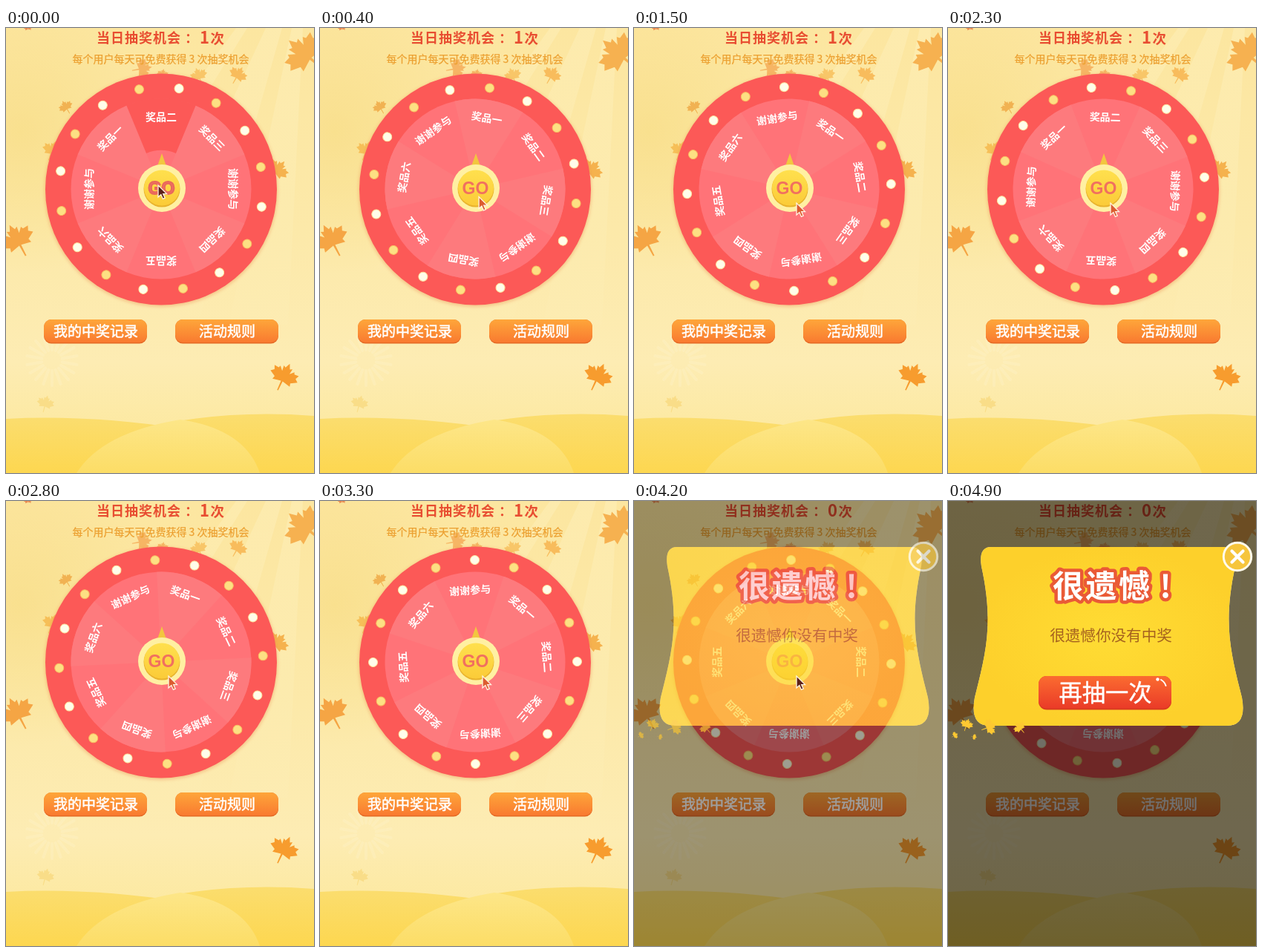
Write an HTML page that moves like this. It is 415 by 600 pixels and loops after 5000 ms.

```html
<!DOCTYPE html>
<html lang="zh-CN">
<head>
<meta charset="utf-8">
<title>幸运转盘</title>
<style>
  html, body { margin: 0; width: 100%; height: 100%; overflow: hidden; background: #fcebb0; }
  svg { display: block; width: 415px; height: 600px; }
  text { font-family: "Noto Sans CJK SC", "Noto Sans CJK", "Noto Sans", sans-serif; }
</style>
</head>
<body>
<svg viewBox="0 0 415 600">
  <defs>
    <linearGradient id="sky" x1="0" y1="0" x2="0" y2="1">
      <stop offset="0" stop-color="#fce6a0"/>
      <stop offset=".45" stop-color="#fce9a9"/>
      <stop offset=".75" stop-color="#fdecb3"/>
      <stop offset="1" stop-color="#fce796"/>
    </linearGradient>
    <radialGradient id="glow" gradientUnits="userSpaceOnUse" cx="20" cy="140" r="190">
      <stop offset="0" stop-color="#f7db80" stop-opacity=".6"/>
      <stop offset="1" stop-color="#f7db80" stop-opacity="0"/>
    </radialGradient>
    <linearGradient id="ray" gradientUnits="userSpaceOnUse" x1="400" y1="0" x2="230" y2="420">
      <stop offset="0" stop-color="#fff7cf" stop-opacity=".3"/>
      <stop offset="1" stop-color="#fff7cf" stop-opacity="0"/>
    </linearGradient>
    <linearGradient id="hill" x1="0" y1="0" x2="0" y2="1">
      <stop offset="0" stop-color="#fbdd6e"/>
      <stop offset="1" stop-color="#fdd750"/>
    </linearGradient>
    <linearGradient id="path" x1="0" y1="0" x2="0" y2="1">
      <stop offset="0" stop-color="#fde688"/>
      <stop offset="1" stop-color="#fcdd66"/>
    </linearGradient>
    <linearGradient id="orange" x1="0" y1="0" x2="0" y2="1">
      <stop offset="0" stop-color="#fea63a"/>
      <stop offset="1" stop-color="#f97a30"/>
    </linearGradient>
    <linearGradient id="red" x1="0" y1="0" x2="0" y2="1">
      <stop offset="0" stop-color="#fb6c30"/>
      <stop offset="1" stop-color="#ea3b28"/>
    </linearGradient>
    <linearGradient id="gold" x1="0" y1="0" x2="0" y2="1">
      <stop offset="0" stop-color="#ffe04e"/>
      <stop offset="1" stop-color="#fbcb38"/>
    </linearGradient>
    <radialGradient id="panelFill">
      <stop offset="0" stop-color="#ffdc34"/>
      <stop offset="1" stop-color="#fdd02b"/>
    </radialGradient>
    <filter id="soft" x="-10%" y="-10%" width="120%" height="120%"><feGaussianBlur stdDeviation="2"/></filter>
  </defs>

  <rect width="415" height="600" fill="url(#sky)"/>
  <rect width="415" height="400" fill="url(#glow)"/>
  <path d="M350 0H372L250 430H150ZM385 0H400L380 400H300ZM310 0H325L120 330H70Z" fill="url(#ray)"/>
  <g id="flower" stroke="#fff6d2" stroke-width="4" stroke-linecap="round" opacity=".25"/>
  <path d="M0 527Q110 521 235 540V600H0Z" fill="url(#hill)"/>
  <path d="M215 533Q310 515 415 523V600H215Z" fill="url(#hill)"/>
  <path d="M95 600Q130 545 235 528Q322 541 342 600Z" fill="url(#path)"/>
  <g id="leaves"/>
  <g id="header"/>

  <circle cx="209" cy="219" r="157" fill="#e88a50" opacity=".4" filter="url(#soft)"/>
  <circle cx="209" cy="217.5" r="156" fill="#fc5957"/>
  <g id="lamps"/>
  <g id="disc"/>
  <g id="picked"/>
  <path d="M210 169L217 189H203Z" fill="#f2c63f"/>
  <circle cx="210" cy="216" r="32" fill="#fff0a2"/>
  <circle cx="210" cy="217" r="24.5" fill="#e9b32d"/>
  <circle cx="210" cy="215.5" r="24" fill="url(#gold)"/>
  <text id="go" x="209.5" y="224.3" font-size="23" font-weight="700" text-anchor="middle" fill="#f1705f"
    stroke="#e8685c" style="font-family:'Liberation Sans',sans-serif">GO</text>
  <g id="buttons"/>

  <path id="shade" fill-rule="evenodd"/>
  <g id="popup">
    <path id="panel" fill="url(#panelFill)"/>
    <g id="petals"/>
    <g id="popupText"/>
    <circle cx="390" cy="75" r="18.7" fill="#f6c53b" stroke="#fffbea" stroke-width="3"/>
    <path d="M382.5 67.5L397.5 82.5M397.5 67.5L382.5 82.5" stroke="#fff" stroke-width="4.2" stroke-linecap="round"/>
  </g>
  <g id="again">
    <rect x="122" y="236" width="179" height="45.5" rx="11" fill="#d93a20"/>
    <rect x="122" y="236" width="179" height="43.5" rx="11" fill="url(#red)"/>
    <circle cx="282.5" cy="240.5" r="2.2" fill="#fff"/>
    <path d="M287 241Q292 244 293.5 249" fill="none" stroke="#fff" stroke-width="2" stroke-linecap="round"/>
  </g>
  <path id="cursor" d="M0 0V16L3.8 12.6L6.4 18.4L9.2 17.2L6.7 11.6H11.5Z" stroke="#fff3e2" stroke-width="1.3"/>
</svg>
<script>
const LOOP = 5000, STEP = 100;
const CX = 209, CY = 217;
const SPIN = { start: 160, length: 4000, angle: 1890 };
const LAMPS = { from: -12.4, lap: 7000 };
const POPUP_AT = 4200;
const PRIZES = ['奖品二', '奖品三', '谢谢参与', '奖品四', '奖品五', '奖品六', '谢谢参与', '奖品一'];
const PANEL = 'M58 62H374Q391 62 387 88C370 165 381 205 396 265Q403 303 376 303H56Q29 303 36 265C51 205 62 165 45 88Q41 62 58 62Z';

const $ = id => document.getElementById(id);

function add(parent, tag, attrs) {
  const node = document.createElementNS('http://www.w3.org/2000/svg', tag);
  for (const key in attrs) node.setAttribute(key, attrs[key]);
  return parent.appendChild(node);
}

// Places CJK text by its vertical middle.
function label(parent, str, x, midY, size, attrs) {
  const node = add(parent, 'text', { x, y: midY + size * 0.38, 'font-size': size, ...attrs });
  node.textContent = str;
  return node;
}

function polar(r, deg) {
  const a = deg * Math.PI / 180;
  return [CX + r * Math.sin(a), CY - r * Math.cos(a)];
}

function sector(inner, outer, from, to) {
  return `M${polar(inner, from)}L${polar(outer, from)}A${outer} ${outer} 0 0 1 ${polar(outer, to)}` +
    `L${polar(inner, to)}A${inner} ${inner} 0 0 0 ${polar(inner, from)}Z`;
}

function prize(parent, name, at) {
  label(parent, name, CX, CY - 97, 14, { fill: '#fff', 'font-weight': 700, 'text-anchor': 'middle',
    transform: `rotate(${at} ${CX} ${CY})` });
}

const HALF_LEAF = [[0, -1], [.16, -.66], [.32, -.74], [.27, -.36], [.52, -.62], [.58, -.48], [.9, -.5],
  [.78, -.24], [1, -.06], [.58, .18], [.64, .4], [.06, .28], [.04, .95]];
const LEAF = 'M' + [...HALF_LEAF, ...HALF_LEAF.map(([x, y]) => [-x, y]).reverse()].join('L') + 'Z';

function leaf(parent, x, y, size, turn, fill) {
  add(parent, 'path', { d: LEAF, fill, transform: `translate(${x} ${y}) rotate(${turn}) scale(${size})` });
}

function build() {
  for (let i = 0; i < 18; i++)
    add($('flower'), 'path', { d: 'M0 -14V-34', transform: `translate(62 448) rotate(${i * 20})` });

  [[404, 36, 30, -50, '#f6b150'], [312, 64, 13, 30, '#f8bc5c'], [183, 55, 14, 80, '#f6b564'],
   [211, 63, 8, 10, '#f6b564'], [260, 65, 12, -20, '#f8c668'], [81, 107, 10, -30, '#f1b252'],
   [62, 166, 14, 20, '#f6bf58'], [365, 192, 16, 40, '#f5b24e'], [16, 287, 24, -28, '#f5a544'],
   [374, 471, 20, 25, '#f79c2e'], [53, 507, 12, 15, '#f9dd88'], [30, -3, 7, 150, '#ea8a50']]
    .forEach(l => leaf($('leaves'), ...l));

  const title = { fill: '#e84d31', 'font-weight': 700 };
  label($('header'), '当日抽奖机会', 122, 13.5, 18, { ...title, 'letter-spacing': 1 });
  label($('header'), '：', 241, 13.5, 18, title);
  label($('header'), '1', 267.5, 13, 22, { ...title, id: 'count', 'text-anchor': 'middle' });
  label($('header'), '次', 275.5, 13.5, 18.5, title);
  label($('header'), '每个用户每天可免费获得 3 次抽奖机会', 208.5, 41.5, 14,
    { fill: '#eca031', stroke: '#eca031', 'stroke-width': .25, 'text-anchor': 'middle' });

  for (let i = 0; i < 16; i++) {
    const [cx, cy] = polar(137.5, i * 22.5);
    add($('lamps'), 'circle', { cx, cy, r: 6, fill: i % 2 ? '#fffdea' : '#fde083',
      stroke: i % 2 ? '#fde5a0' : '#f9bd62' });
  }

  add($('disc'), 'circle', { cx: CX, cy: CY, r: 121.5, fill: '#ff7378' });
  PRIZES.forEach((name, i) => {
    const at = i * 45;
    if (i % 2) add($('disc'), 'path', { d: sector(1, 121.5, at - 22.5, at + 22.5), fill: '#fd7a7d' });
    prize($('disc'), name, at);
  });
  add($('picked'), 'path', { d: sector(52, 122, -22.5, 22.5), fill: '#fc5957' });
  prize($('picked'), PRIZES[0], 0);

  const white = { fill: '#fff', stroke: '#fff', 'stroke-width': .5, 'text-anchor': 'middle' };
  [[51, '我的中奖记录'], [228, '活动规则']].forEach(([x, name]) => {
    const box = { x, width: 139, rx: 10 };
    add($('buttons'), 'rect', { ...box, y: 393, height: 32.5, fill: '#e56a25' });
    add($('buttons'), 'rect', { ...box, y: 393, height: 31, fill: 'url(#orange)' });
    label($('buttons'), name, x + 70, 409, 19, white);
  });

  $('panel').setAttribute('d', PANEL);
  $('shade').setAttribute('d', 'M0 0H415V600H0Z' + PANEL);
  [[25, 302, 9, 20], [55, 305, 11, 70], [97, 306, 9, -40], [9, 316, 5, 60], [35, 318, 4, 100]]
    .forEach(p => leaf($('petals'), ...p, '#fdc832'));

  const big = { fill: '#fff', stroke: '#ea5a36', 'stroke-width': 9, 'stroke-linejoin': 'round',
    'paint-order': 'stroke', 'font-weight': 900 };
  label($('popupText'), '很遗憾', 141, 114, 42, { ...big, 'letter-spacing': 2.5 });
  label($('popupText'), '!', 293, 114, 42, { ...big, 'text-anchor': 'middle' });
  label($('popupText'), '很遗憾你没有中奖', 219.5, 181, 20.6, { fill: '#a5621f', 'text-anchor': 'middle' });
  label($('again'), '再抽一次', 212, 258.5, 31.3, white);
}

const clamp = v => Math.min(1, Math.max(0, v));

function show(id, on) {
  $(id).setAttribute('visibility', on ? 'visible' : 'hidden');
}

function turn(id, angle) {
  $(id).setAttribute('transform', `rotate(${angle} ${CX} ${CY})`);
}

function draw(t) {
  const left = 1 - clamp((t - SPIN.start) / SPIN.length);
  turn('disc', SPIN.angle * (1 - left ** 4));
  turn('lamps', LAMPS.from + 360 * t / LAMPS.lap);

  const idle = t < SPIN.start;
  show('picked', idle);
  $('go').setAttribute('stroke-width', t < STEP ? 2 : 0);

  const open = t >= POPUP_AT;
  const settled = t >= POPUP_AT + STEP;
  $('count').textContent = open ? '0' : '1';
  $('shade').setAttribute('opacity', settled ? 0.56 : open ? 0.38 : 0);
  $('popup').setAttribute('opacity', settled ? 1 : open ? 0.65 : 0);
  show('again', settled);

  const move = clamp((t - STEP) / 500);
  const ease = move * move * (3 - 2 * move);
  $('cursor').setAttribute('transform', `translate(${205 + 14 * ease} ${212 + 24 * ease})`);
  $('cursor').setAttribute('fill', idle || open ? '#5c2018' : '#dc5c30');
  show('cursor', t < 4500);
}

build();
const begin = performance.now();
function tick() {
  const t = (performance.now() - begin) % LOOP;
  draw(Math.floor(t / STEP) * STEP);
  requestAnimationFrame(tick);
}
tick();
</script>
</body>
</html>
```
